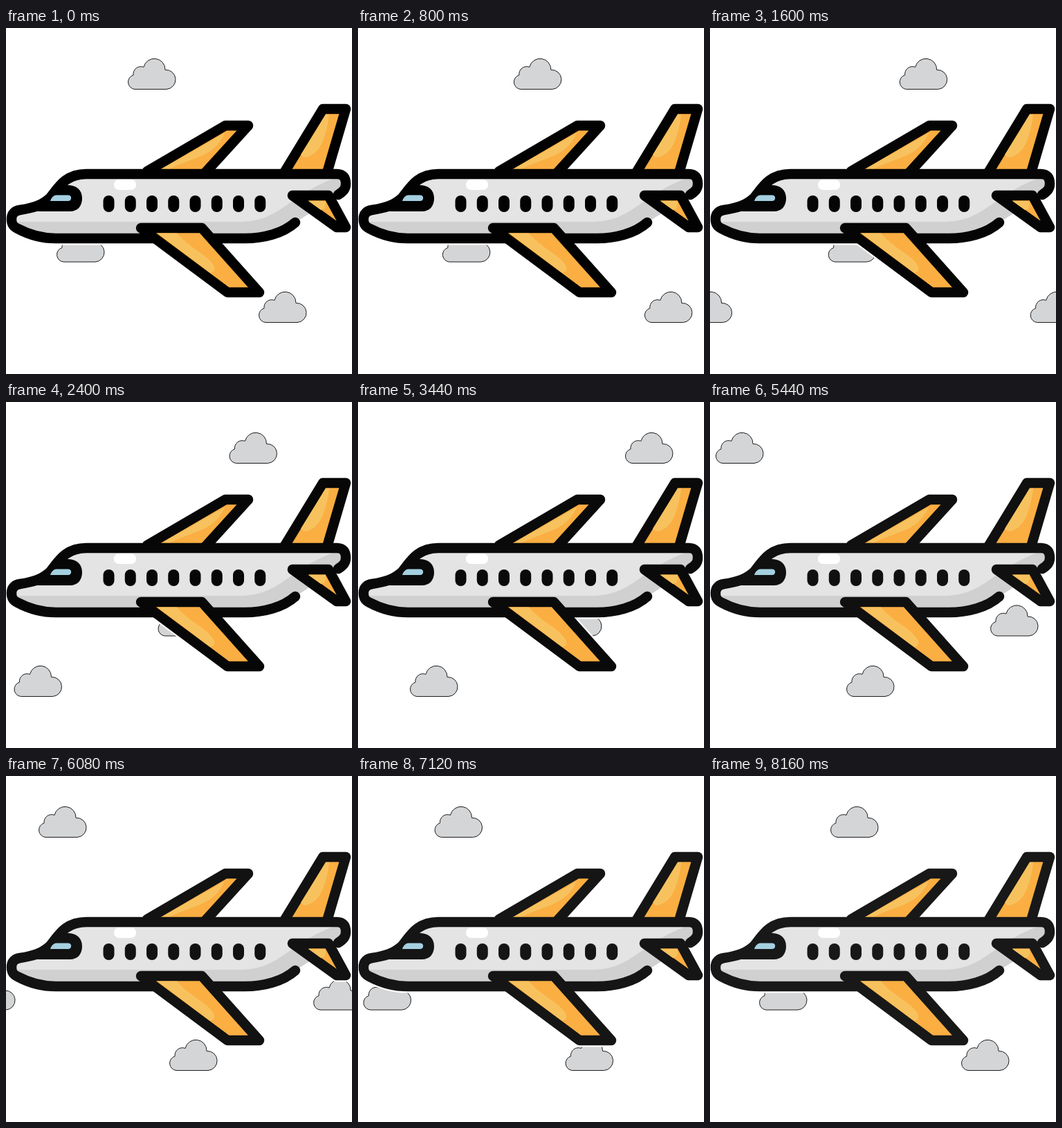
An HTML page for the animation above (8.24 s loop, 500 px wide and 500 px high).

```html
<!DOCTYPE html>
<html lang="en">
<head>
<meta charset="utf-8">
<title>Plane and clouds</title>
<style>
  html, body { margin: 0; width: 100%; height: 100%; overflow: hidden; background: #fff; }
  svg { display: block; width: 100%; height: 100%; }
  #outline { stroke: currentColor; stroke-width: 14.5; stroke-linejoin: round; stroke-linecap: round; }
  .wing { fill: #fbae42; }
  .shine { fill: #f7c25e; }
</style>
</head>
<body>
<svg viewBox="0 0 500 500">
  <defs>
    <path id="cloud" d="M11 45A10.5 10.5 0 0 1 9 24.5A11 11 0 0 1 24 13A15.7 15.7 0 0 1 55 17A14 14 0 0 1 57 45Z"
      fill="#d4d5d7" stroke="#1c1c1c"/>
    <path id="body" d="M418 281C400 297 372 304 345 304H72C50 304 32 298 17 290C10 287 8 283 8 276C8 268 13 264 20 263C40 260 52 256 64 245C76 230 86 211 116 211H478C487 211 491 216 491 225C491 232 488 236 480 241"/>
    <path id="farWing" d="M204 207L317 141H350L288 209"/>
    <path id="fin" d="M402 209L458 117H491L464 209"/>
    <path id="stabilizer" d="M414 242H466L491 288H478Z"/>
    <path id="nearWing" d="M195 289H283L366 382H320Z"/>
    <g id="silhouette">
      <use href="#farWing"/><use href="#fin"/><use href="#body"/>
      <use href="#stabilizer"/><use href="#nearWing"/>
    </g>
  </defs>

  <g id="sky"></g>

  <!-- thin white margin that keeps the clouds off the plane -->
  <use href="#silhouette" fill="#fff" stroke="#fff" stroke-width="19" stroke-linejoin="round" stroke-linecap="round"/>

  <g id="plane">
    <g id="outline">
      <use href="#farWing" class="wing"/>
      <path class="shine" stroke="none" d="M226 203L316 152C308 170 296 179 280 186C262 193 246 198 236 204Z"/>
      <use href="#fin" class="wing"/>
      <path class="shine" stroke="none" d="M426 183L462 125H467C464 150 456 186 430 187Z"/>

      <use href="#body" fill="#e4e4e4" stroke="none"/>
      <path fill="#d0d0d0" stroke="none" d="M12 280H335C395 281 405 244 472 218H486V232L480 241L418 281C400 297 372 304 345 304H72C40 303 16 292 12 280Z"/>
      <rect x="156" y="219" width="32" height="15" rx="7" fill="#fff" stroke="none"/>
      <use href="#body" fill="none"/>

      <use href="#stabilizer" class="wing"/>
      <path class="shine" stroke="none" d="M437 250L455 263Q464 262 461 250Z"/>
      <use href="#nearWing" class="wing"/>
      <path class="shine" stroke="none" d="M219 296.5H247C262 315 290 328 298 340Q306 352 295 354Z"/>
    </g>
    <path fill="currentColor" d="M24 265H92C104 265 110 257 110 246C110 234 102 227 88 227L74 230L50 257Z"/>
    <path fill="#a4d0e0" d="M72 241.500H90Q95 242 94 247Q93 250 90 250H64Q66 243 72 241.500Z"/>
    <g id="windows" fill="currentColor"></g>
  </g>
</svg>
<script>
  const LOOP = 8240, STEP = 80, SPEED = 498 / 8160, WIDTH = 500;
  const NS = "http://www.w3.org/2000/svg";
  const byId = id => document.getElementById(id);

  function add(parent, tag, attrs) {
    const node = document.createElementNS(NS, tag);
    for (const name in attrs) node.setAttribute(name, attrs[name]);
    return parent.appendChild(node);
  }

  for (let i = 0; i < 8; i++)
    add(byId("windows"), "rect", { x: 140.5 + i * 31.25, y: 242, width: 16, height: 24, rx: 8 });

  // Each cloud is drawn twice, one stage width apart, so it wraps smoothly.
  const clouds = [[175, 43.5], [72, 293], [364, 380.5]].map(([x, y]) => ({
    x, y, copies: [0, 1].map(() => add(byId("sky"), "use", { href: "#cloud" }))
  }));

  function draw(now) {
    const time = Math.floor(now % LOOP / STEP) * STEP;
    for (const { x, y, copies } of clouds) {
      const left = (x + time * SPEED) % WIDTH;
      copies.forEach((copy, i) =>
        copy.setAttribute("transform", `translate(${left - i * WIDTH} ${y})`));
    }
    const ink = Math.round(24 * time / LOOP);
    byId("plane").style.color = `rgb(${ink},${ink},${ink})`;
  }

  const start = performance.now();
  function tick() {
    draw(performance.now() - start);
    requestAnimationFrame(tick);
  }
  tick();
</script>
</body>
</html>
```
